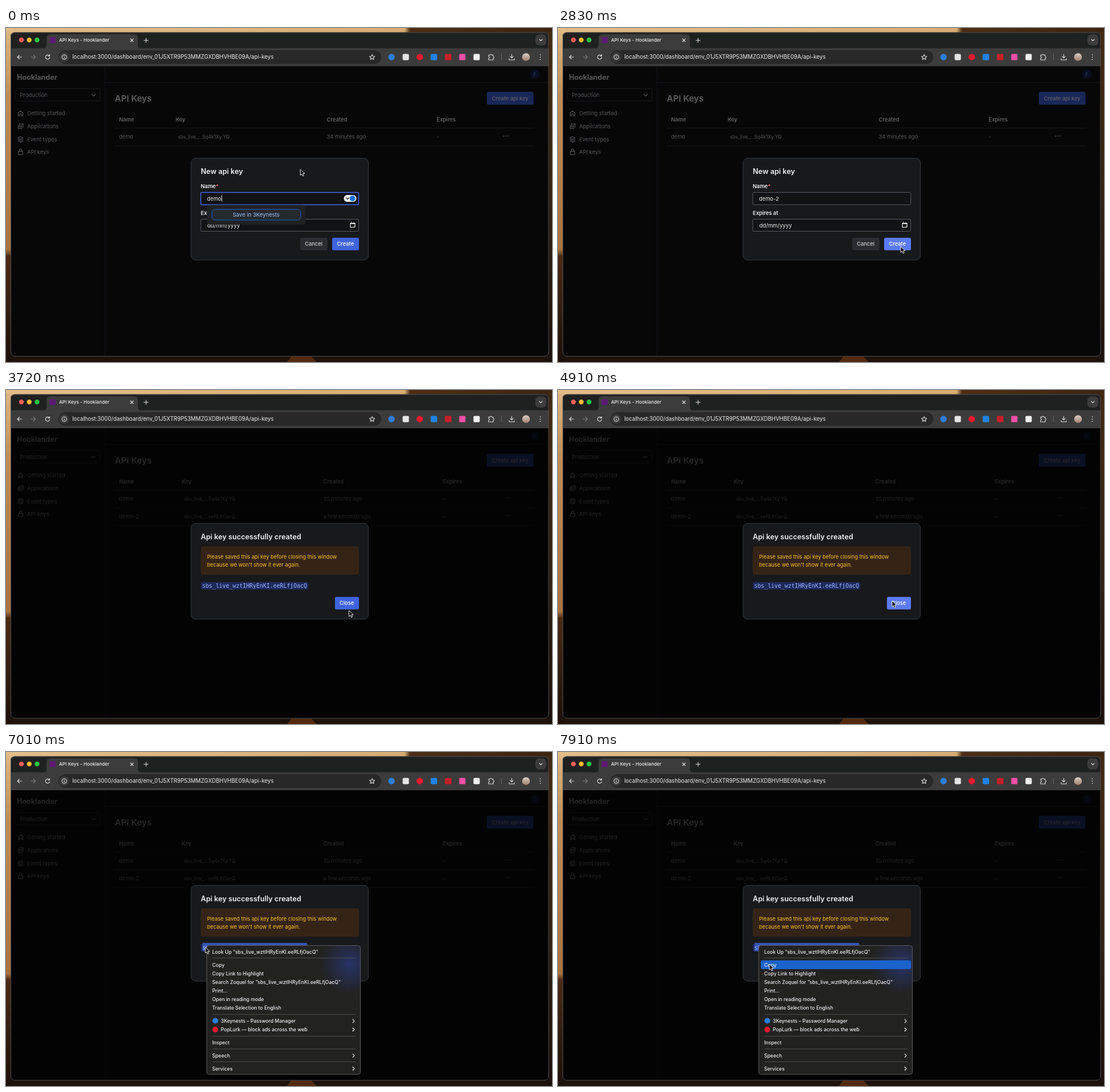
Recreate the animation shown at these times as an HTML page. Size 956x586 px, loop 8000 ms.

```html
<!DOCTYPE html>
<html lang="en">
<head>
<meta charset="utf-8">
<title>API Keys</title>
<style>
html, body { margin: 0; width: 100%; height: 100%; overflow: hidden; background: #1e120b; }
svg { display: block; font: 9.35px Inter, "Open Sans", sans-serif; fill: #edeef0; }
.line { fill: none; stroke: currentColor; stroke-width: 1.1; stroke-linecap: round; stroke-linejoin: round; }
.dots { stroke-width: 1.7; }
.muted { fill: #cfd2d6; }
.semi { font-weight: 600; }
.med { font-weight: 500; }
.title { font-weight: 600; font-size: 12.65px; }
.mid { text-anchor: middle; }
.mono { font: 9.83px "DejaVu Sans Mono", monospace; fill: #9eb1ff; }
.menu { font-size: 8.6px; font-weight: 500; }
</style>
</head>
<body>
<svg width="956" height="586" viewBox="0 0 956 586">
  <defs>
    <linearGradient id="top"><stop offset="0" stop-color="#e2bd88"/><stop offset=".73" stop-color="#d8ad74"/><stop offset=".74" stop-color="#4d2e15"/><stop offset="1" stop-color="#3c2411"/></linearGradient>
    <linearGradient id="left" x2="0" y2="1"><stop offset="0" stop-color="#dcb580"/><stop offset=".2" stop-color="#be8d58"/><stop offset=".66" stop-color="#a8733f"/><stop offset=".68" stop-color="#4a2a14"/><stop offset="1" stop-color="#1c100a"/></linearGradient>
    <linearGradient id="right" x2="0" y2="1"><stop offset="0" stop-color="#41280f"/><stop offset=".5" stop-color="#332010"/><stop offset="1" stop-color="#1a100a"/></linearGradient>
    <linearGradient id="face" x2="0" y2="1"><stop offset="0" stop-color="#d8cfc6"/><stop offset="1" stop-color="#a5806c"/></linearGradient>
    <radialGradient id="glow"><stop offset="0" stop-color="#2b3f96" stop-opacity=".6"/><stop offset="1" stop-color="#2b3f96" stop-opacity="0"/></radialGradient>
    <clipPath id="frame"><rect x="8" y="7.5" width="942.5" height="569" rx="7"/></clipPath>
    <clipPath id="sheet"><rect x="351.5" y="339.5" width="269" height="226" rx="4"/></clipPath>
  </defs>

  <!-- desktop -->
  <rect width="956" height="586" fill="#1e120b"/>
  <path d="M492 586l8-10h34l10 10z" fill="#54290f"/>
  <rect width="956" height="10" fill="url(#top)"/>
  <rect y="6" width="10" height="580" fill="url(#left)"/>
  <rect x="948" y="6" width="8" height="580" fill="url(#right)"/>

  <!-- browser -->
  <g clip-path="url(#frame)">
    <rect x="8" y="7" width="943" height="31" fill="#1f2020"/>
    <path d="M65 36q6 0 6-6V18q0-7 7-7h146q7 0 7 7v12q0 6 6 6z" fill="#3c3c3c"/>
    <rect x="8" y="35.5" width="943" height="32" fill="#3c3c3c"/>
    <rect x="8" y="67" width="943" height="510" fill="#111113"/>
  </g>
  <circle cx="27" cy="21" r="4.2" fill="#ff5f57"/><circle cx="40.7" cy="21" r="4.2" fill="#febc2e"/><circle cx="54.4" cy="21" r="4.2" fill="#28c840"/>
  <rect x="76.5" y="16" width="10.5" height="10.5" rx="2" fill="#5f1b74"/>
  <text x="93" y="24.3" class="med" font-size="8.2">API Keys - Hooklander</text>
  <rect x="927" y="11.5" width="19" height="19" rx="6" fill="#3c3c3c"/>
  <rect x="92" y="39" width="565" height="24" rx="12" fill="#282828"/>
  <circle cx="102" cy="51" r="8.5" fill="#3c3c3c"/>
  <text x="116" y="54.3" font-size="9.66">localhost:3000/dashboard/env_01J5XTR9P53MMZGXDBHVHBE09A/api-keys</text>
  <g class="line" color="#dcdcdc">
    <path d="M218 19l5 5m0-5l-5 5M241.5 21.5h7.5m-3.75-3.75v7.5M934 20l2.5 2.5 2.5-2.5"/>
    <path d="M27.5 51h-7.5m3.5-3.5l-3.5 3.5 3.5 3.5"/>
    <path d="M44 51h7.5m-3.5-3.5l3.5 3.5-3.5 3.5" stroke="#777"/>
    <path d="M76 49a3.7 3.7 0 1 0 .5 3M76.5 46.5v2.7h-2.7"/>
    <circle cx="102" cy="51" r="4"/><path d="M102 50.7v2.3m0-4.2v.1"/>
    <path d="M641 46.500l1.300 3 3.300.3-2.500 2.200.8 3.200-2.900-1.700-2.900 1.700.8-3.200-2.500-2.200 3.300-.3z"/>
    <path d="M845 47.500h2.500a1.500 1.500 0 0 1 3 0h2.500v2.500a1.500 1.500 0 0 1 0 3v3h-8v-3a1.500 1.500 0 0 0 0-3z"/>
    <path d="M885.500 46v6.500m-2.700-2.700l2.700 2.700 2.700-2.700M881 53.500v2.500h9v-2.500"/>
    <path d="M867.500 46v10" stroke="#666"/>
    <path d="M935.500 47v.1m0 3.900v.1m0 3.900v.1" class="dots"/>
  </g>
  <circle cx="675" cy="51" r="5.7" fill="#2b7de0"/>
  <rect x="694.5" y="45.5" width="11" height="11" rx="2" fill="#e4e4e4"/>
  <circle cx="724.5" cy="51" r="5.7" fill="#e8192c"/>
  <rect x="743.5" y="45.5" width="11.5" height="11" rx="2" fill="#1f83e6"/>
  <rect x="768.5" y="45.5" width="11.5" height="11" rx="2" fill="#c81e28"/>
  <rect x="793.5" y="45.5" width="11" height="11" rx="1.5" fill="#ef4fa6"/>
  <rect x="818.5" y="45.5" width="11" height="11" rx="2" fill="#f0f0f0"/>
  <circle cx="910.5" cy="51" r="6.8" fill="url(#face)"/>

  <!-- page -->
  <path d="M173.500 67v509M173.500 95.500h777" stroke="#303236"/>
  <text x="19" y="90.8" class="title">Hooklander</text>
  <rect x="16.5" y="106.5" width="148" height="21.5" rx="3" fill="none" stroke="#3c3f44"/>
  <g class="muted" font-size="9.45">
    <text x="24.5" y="120.8">Production</text>
    <text x="37" y="153">Getting started</text>
    <text x="37" y="175.8">Applications</text>
    <text x="37" y="198.5">Event types</text>
    <text x="37" y="221.2">API keys</text>
  </g>
  <g class="line" color="#cfd2d6">
    <path d="M150.500 116.500l2.800 2.800 2.800-2.800"/>
    <path d="M21.500 149l4-3.700 4 3.700v5h-2.500v-3.500h-3v3.500h-2.500z"/>
    <path d="M23.500 168h6.500v6h-6.500zM21.500 170v6.500h6.500M25 171l1.300 1.300 2.300-2.600"/>
    <path d="M21 192.800l4.500-2.300 4.500 2.300-4.500 2.300zM21 195.500l4.500 2.300 4.500-2.300M21 198l4.500 2.300 4.500-2.300"/>
    <path d="M21.500 216.500h8v6h-8zM23.300 216.500v-2a2.200 2.200 0 0 1 4.400 0v2"/>
  </g>
  <circle cx="926" cy="81.5" r="8" fill="#182449"/>
  <text x="926" y="84.7" class="mid" fill="#4f76f0">F</text>
  <text x="190.5" y="129" class="title" style="font-size:15.1px">API Keys</text>
  <rect x="842" y="112" width="81.5" height="22.5" rx="2.5" fill="#3e63dd"/>
  <text x="882.7" y="126.5" class="med mid">Create api key</text>
  <g id="table"></g>
  <rect x="9" y="67.5" width="941" height="508" fill-opacity=".6" fill="#000"/>
  <rect id="shade" x="9" y="67.5" width="941" height="508" fill="#000"/>
  <rect x="8.5" y="8" width="941.5" height="568" rx="7" fill="none" stroke="#505050"/>

  <!-- form dialog -->
  <g id="form">
    <rect x="324" y="228.5" width="310.5" height="178.5" rx="8" fill="#18191b" stroke="#35383c"/>
    <text x="341" y="256" class="title">New api key</text>
    <text x="341" y="281" class="semi">Name<tspan fill="#ff6b62">*</tspan></text>
    <rect id="field" x="341" y="288.5" width="276.5" height="21.5" rx="2" fill="#111214"/>
    <text id="value" x="352" y="302.7"></text>
    <rect id="caret" y="293.5" width="1" height="11"/>
    <text x="341" y="328" class="semi">Expires at</text>
    <rect x="341" y="335.5" width="276.5" height="21" rx="2" fill="#111214" stroke="#565a60"/>
    <text x="352.5" y="349.6" font-size="9.6">dd/mm/yyyy</text>
    <path d="M603 342.500h8v7h-8zM603 343.300h8M605 341v1.500m4-1.500v1.500" class="line" color="#fff"/>
    <rect x="515" y="368" width="48" height="22" rx="2.5" fill="#2b2c2f"/>
    <text x="538.7" y="382.4" class="med mid muted">Cancel</text>
    <rect id="create" x="571" y="368" width="47" height="22" rx="2.5"/>
    <text x="594.3" y="382.4" class="med mid" fill="#fff">Create</text>
    <g id="popup">
      <rect x="591.5" y="293" width="22" height="12" rx="6" fill="#f4f4f4"/>
      <path d="M595.700 298l2.300 2.300 2.300-2.300" class="line" color="#111"/>
      <circle cx="606.7" cy="299" r="5" fill="#1a73d9"/>
      <rect x="352" y="310.5" width="172" height="34.5" rx="5" fill="#202122"/>
      <rect x="360.5" y="318" width="155.5" height="19" rx="6" fill="#25292e" stroke="#1661c9"/>
      <text x="438" y="331" class="mid" font-size="9.5" fill="#9cc4fb">Save in 3Keynests</text>
    </g>
  </g>

  <!-- result dialog -->
  <g id="result">
    <rect x="324" y="234" width="310.5" height="168" rx="8" fill="#18191b" stroke="#35383c"/>
    <text x="341" y="261.7" class="title">Api key successfully created</text>
    <rect x="341" y="274.5" width="277" height="49.5" rx="4" fill="#352416"/>
    <g fill="#fcc022" font-size="9.18">
      <text x="352" y="296">Please saved this api key before closing this window</text>
      <text x="352" y="309.7">because we won't show it ever again.</text>
    </g>
    <rect x="341" y="337" width="188.5" height="13" rx="2" fill="#1c2a5b"/>
    <rect id="select" y="335" height="14.5" fill="#3555b4"/>
    <text x="343.5" y="346.5" class="mono">sbs_live_wztIHRyEnKI.eeRLfjOacQ</text>
    <rect id="close" x="576" y="363" width="42" height="22" rx="2.5"/>
    <text x="596.5" y="377.3" class="med mid" fill="#fff">Close</text>
  </g>

  <!-- context menu -->
  <g id="menu" class="menu">
    <rect x="351.5" y="339.5" width="269" height="226" rx="4" fill="#222221" stroke="#5a5a5a"/>
    <circle cx="602" cy="372" r="52" fill="url(#glow)" clip-path="url(#sheet)"/>
    <rect id="hot" x="355" y="365.5" width="263" height="15.5" rx="3" fill="#1b62cc"/>
    <path d="M361 361.500h251m-251 99h251m-251 38h251m-251 22.500h251m-251 22.500h251" stroke="#4d4d4d"/>
    <circle cx="366.5" cy="471.5" r="5" fill="#2b7de0"/>
    <circle cx="366.5" cy="487" r="5" fill="#e8192c"/>
    <g id="items"></g>
  </g>

  <path id="arrow" d="M0 0v10.300l2.400-2.200 1.700 3.700 1.900-.8-1.700-3.700h3.400z" fill="#000" stroke="#fff" stroke-width=".9"/>
  <g id="beam" fill="none">
    <path id="bar" d="M-2.500-5.500q2.500 0 2.500 2v7q0 2-2.500 2M2.500-5.500q-2.500 0-2.500 2v7q0 2 2.500 2M-1.500 2h3"/>
  </g>
</svg>
<script>
const $ = id => document.getElementById(id);
const set = (id, attrs) => { for (const k in attrs) $(id).setAttribute(k, attrs[k]); };
const show = (id, on) => $(id).style.display = on ? '' : 'none';
const LOOP = 8000, TICK = 148.9;

// white bar over a dark outline
const bar = $('bar').getAttribute('d');
$('beam').innerHTML = `<path d="${bar}" stroke="#000" stroke-width="2.2"/><path d="${bar}" stroke="#fff"/>`;

// pointer path: tick, x, y
const path = [[0, 515.3, 248], [13, 515.3, 248], [15, 530, 280], [18, 598, 380], [19, 600, 383.5],
  [21, 600, 384], [22, 600, 386], [23, 600, 386], [25, 600.5, 387], [26, 600.5, 387], [27, 601, 378],
  [28, 600, 372], [29, 600, 372], [33, 585, 370], [36, 551.5, 367], [37, 551.5, 367], [39, 538, 352],
  [40, 526, 345], [41, 510, 345], [43, 370, 343], [44, 348, 342], [45, 346, 343], [46, 346, 343],
  [47, 349, 342.5], [48, 349, 342.5], [51, 360, 364], [53, 370, 372]];
const selection = [[40, 527], [41, 521], [42, 445], [43, 372], [44, 344]];

function at(keys, n) {
  const i = keys.findIndex(k => k[0] >= n);
  if (i < 0) return keys[keys.length - 1].slice(1);
  if (i === 0) return keys[0].slice(1);
  const a = keys[i - 1], b = keys[i], f = (n - a[0]) / (b[0] - a[0]);
  return a.slice(1).map((v, j) => v + (b[j + 1] - v) * f);
}

function table(cols, rows) {
  const [key, created, expires, dots] = cols;
  const text = (x, y, s, c, size = '') => `<text x="${x}" y="${y}" class="${c}" ${size}>${s}</text>`;
  let out = [[198, 'Name'], [key, 'Key'], [created, 'Created'], [expires, 'Expires']]
    .map(([x, s]) => text(x, 164, s, 'semi')).join('');
  out += '<path d="M190 175.5h734" stroke="#303236"/>';
  rows.forEach(([name, code, age], i) => {
    const y = 194.3 + 31 * i;
    out += text(198, y, name, 'muted') + text(key + 4, y, code, 'muted', 'font-size="8.4"') +
      text(created, y, age, 'muted') + text(expires, y, '-', 'muted') +
      `<path d="M${dots} ${y - 4.8}v.1m3.8-.1v.1m3.8-.1v.1" class="line dots" color="#edeef0"/>` +
      `<path d="M190 ${206.5 + 31 * i}h734" stroke="#303236"/>`;
  });
  return out;
}
const before = table([297, 561.5, 754, 871.5], [['demo', 'sbs_live_...Sq4k1Xy.YQ', '34 minutes ago']]);
const after = table([307.5, 555.5, 765, 875.5], [['demo', 'sbs_live_...Sq4k1Xy.YQ', '35 minutes ago'],
  ['demo-2', 'sbs_live_...eeRLfjOacQ', 'a few seconds ago']]);

const key = '“sbs_live_wztIHRyEnKI.eeRLfjOacQ”';
$('items').innerHTML = [
  [353.5, 'Look Up ' + key], [376.5, 'Copy'], [391.5, 'Copy Link to Highlight'],
  [406.8, `Search Zoquel for ${key}`], [422, 'Print…'], [437, 'Open in reading mode'],
  [452.3, 'Translate Selection to English'], [474.8, '3Keynests – Password Manager', 1, 15],
  [490, 'PopLurk — block ads across the web', 1, 15], [513, 'Inspect'], [535.7, 'Speech', 1], [558.5, 'Services', 1]
].map(([y, s, sub, dx = 0]) => `<text x="${361 + dx}" y="${y}">${s}</text>` +
  (sub ? `<path d="M607 ${y - 6}l3 3-3 3" class="line" color="#eee"/>` : '')).join('');

let last = -1;
function draw() {
  const n = Math.floor((performance.now() % LOOP + 6) / TICK);
  if (n !== last) render(last = n);
  requestAnimationFrame(draw);
}

function render(n) {
  const [x, y] = at(path, n), focus = n < 18, done = n >= 20;
  const fade = n < 20 ? 0 : n === 20 ? .5 : n === 21 ? .9 : 1;
  $('table').innerHTML = done ? after : before;
  set('shade', { 'fill-opacity': .6 * fade });

  $('value').textContent = n < 9 ? 'demo' : n < 12 ? 'demo-' : 'demo-2';
  set('field', { stroke: focus ? '#4468ee' : '#565a60', 'stroke-width': focus ? 1.4 : 1 });
  set('caret', { x: 352.3 + $('value').getComputedTextLength() });
  show('caret', n < 1 || n >= 5 && n < 8 || n >= 9 && focus);
  show('popup', focus);
  set('create', { fill: n >= 18 ? '#5b7af5' : '#3e63dd' });
  set('form', { opacity: 1 - fade });

  set('result', { opacity: fade });
  const hover = x > 576 && x < 618 && y > 363 && y < 385;
  set('close', { fill: hover ? '#5b7af5' : '#3e63dd' });
  const from = at(selection, n)[0];
  set('select', { x: from, width: 527 - from });

  show('menu', n >= 47);
  show('hot', n >= 47 && y > 365.5);
  const beam = n >= 40 && n < 47;
  show('arrow', !beam);
  show('beam', beam);
  set(beam ? 'beam' : 'arrow', { transform: `translate(${x} ${y})` });
}
draw();
</script>
</body>
</html>
```
